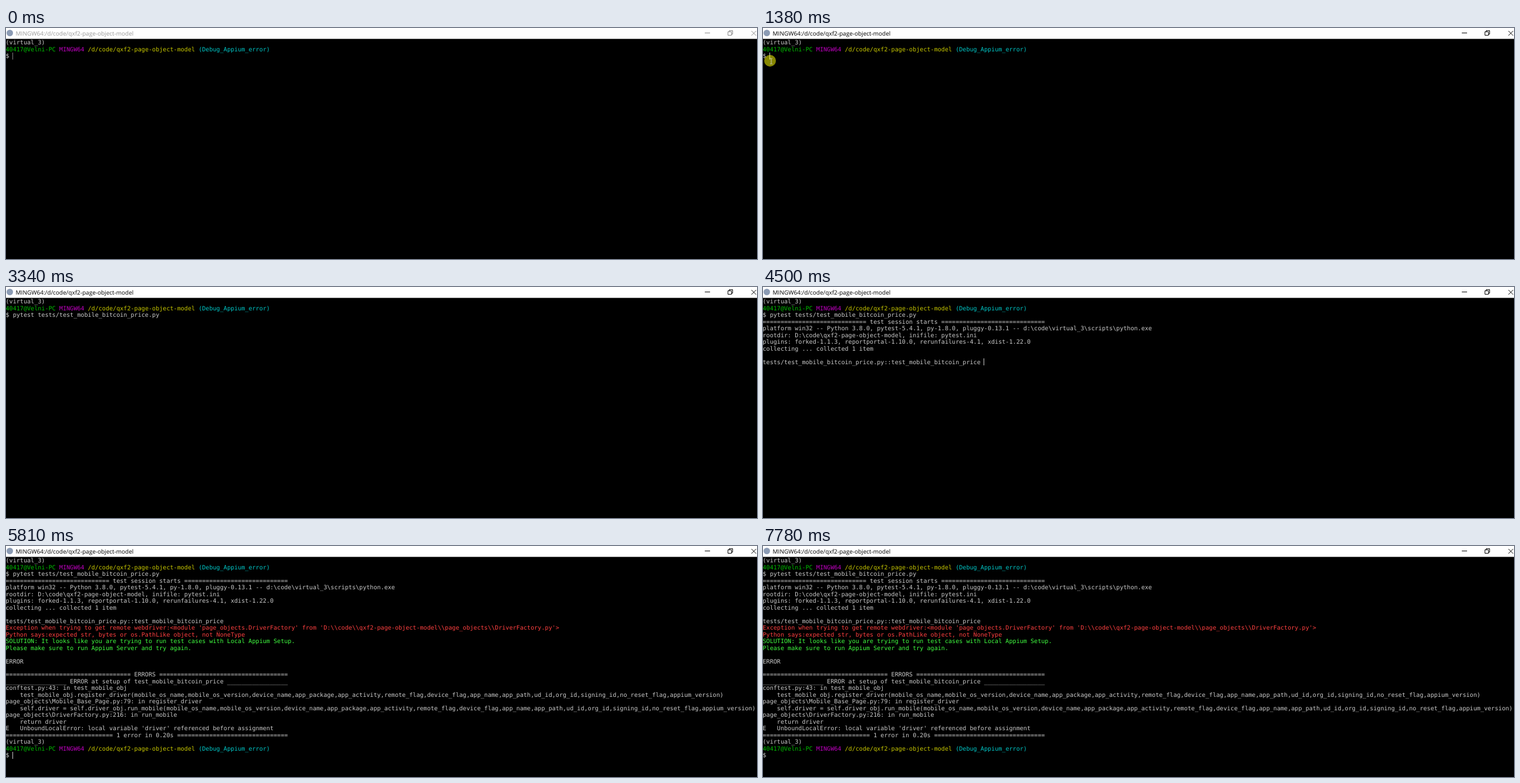
An HTML page that plays this animation: 1280 px wide and 395 px high, repeating every 8 s.

```html
<!DOCTYPE html>
<html lang="en">
<head>
<meta charset="utf-8">
<title>Terminal session</title>
<style>
  html, body { margin: 0; width: 100%; height: 100%; overflow: hidden; background: #000; }
  svg { display: block; width: 1280px; height: 395px; }
  text { white-space: pre; text-rendering: geometricPrecision; }
  #terminal text { font: 10.113px "DejaVu Sans Mono", monospace; }
  #title { font: 10px "Open Sans", "Noto Sans", sans-serif; }
</style>
</head>
<body>
<svg viewBox="0 0 1280 395">
  <rect width="1280" height="395" fill="#000"/>
  <rect width="1280" height="18.6" fill="#fff"/>
  <circle cx="6.5" cy="8.5" r="5.5" fill="#8b9bb4"/>
  <text id="title" x="16.6" y="12.7">MINGW64:/d/code/qxf2-page-object-model</text>
  <g id="buttons" fill="none" stroke-width="1">
    <path d="M1191 8.5h9"/>
    <path d="M1230.5 6.5h6v6h-6zM1232.5 6.5v-2h6v6h-2"/>
    <path d="M1270.5 5l8 8m0-8l-8 8"/>
  </g>
  <g id="terminal"></g>
  <rect id="caret" width="1" height="12"/>
  <g id="mouse">
    <circle id="halo" r="10" fill="#ff0" opacity=".53"/>
    <path d="M0 -4h1.5m1 0h1.5M2 -4v9M0 5.5h1.5m1 0h1.5" fill="none" stroke="#d0d0c0"/>
  </g>
</svg>
<script>
const LOOP = 8000;
const CELL_W = 6.088, CELL_H = 11.48, TOP = 19;
const GRAY = '#cacaca', RED = '#ff4040', LIME = '#40ff40';
const $ = id => document.getElementById(id);

const bar = (ch, left, label, right) => `${ch.repeat(left)} ${label} ${ch.repeat(right)}`;
const args = 'mobile_os_name,mobile_os_version,device_name,app_package,app_activity,' +
  'remote_flag,device_flag,app_name,app_path,ud_id,org_id,signing_id,no_reset_flag,appium_version';
const test = 'test_mobile_bitcoin_price';
const command = `pytest tests/${test}.py `;
const raw = String.raw;
const rows = [];

function addRow(time, ...parts) {
  const text = document.createElementNS('http://www.w3.org/2000/svg', 'text');
  text.setAttribute('x', -0.5);
  text.setAttribute('y', TOP + 9.3 + rows.length * CELL_H);
  for (const [content, color = GRAY] of parts) {
    const span = document.createElementNS('http://www.w3.org/2000/svg', 'tspan');
    span.setAttribute('fill', color);
    span.textContent = content;
    text.append(span);
  }
  $('terminal').append(text);
  rows.push({ time, text });
  return text;
}

function addLines(time, color, ...lines) {
  lines.forEach(line => addRow(time, [line, color]));
}

function addPrompt(time) {
  addRow(time, ['(virtual_3)']);
  addRow(time, ['40417@Velni-PC ', '#00bf00'], ['MINGW64 ', '#bf00bf'],
    ['/d/code/qxf2-page-object-model ', '#c8c800'], ['(Debug_Appium_error)', '#00c8c8']);
  return addRow(time, ['$ ']).firstChild;
}

const input = addPrompt(0);
addLines(4500, GRAY,
  bar('=', 29, 'test session starts', 29),
  raw`platform win32 -- Python 3.8.0, pytest-5.4.1, py-1.8.0, pluggy-0.13.1 -- d:\code\virtual_3\scripts\python.exe`,
  raw`rootdir: D:\code\qxf2-page-object-model, inifile: pytest.ini`,
  'plugins: forked-1.1.3, reportportal-1.10.0, rerunfailures-4.1, xdist-1.22.0',
  'collecting ... collected 1 item',
  '',
  `tests/${test}.py::${test}`);
addLines(4650, RED,
  raw`Exception when trying to get remote webdriver:<module 'page_objects.DriverFactory' from 'D:\\code\\qxf2-page-object-model\\page_objects\\DriverFactory.py'>`,
  'Python says:expected str, bytes or os.PathLike object, not NoneType');
addLines(4650, LIME,
  'SOLUTION: It looks like you are trying to run test cases with Local Appium Setup.',
  'Please make sure to run Appium Server and try again.');
addLines(4650, GRAY,
  '',
  'ERROR',
  '',
  bar('=', 35, 'ERRORS', 36),
  bar('_', 17, `ERROR at setup of ${test}`, 17),
  'conftest.py:43: in test_mobile_obj',
  `    test_mobile_obj.register_driver(${args})`,
  raw`page_objects\Mobile_Base_Page.py:79: in register_driver`,
  `    self.driver = self.driver_obj.run_mobile(${args})`,
  raw`page_objects\DriverFactory.py:216: in run_mobile`,
  '    return driver',
  "E   UnboundLocalError: local variable 'driver' referenced before assignment",
  bar('=', 30, '1 error in 0.20s', 31));
addPrompt(4820);

// Each entry holds from its time on; an entry without a value means hidden.
const at = (list, t) => list.findLast(entry => entry[0] <= t);

const typed = [[0, ''], [2630, 'clear'], [2800, command]];
const caretCells = [
  [0, 2, 2], [1930], [2490, 2, 2], [2630, 2, 7], [2800, 2, 44], [3340],
  [4500, 9, 62], [4650], [4820, 29, 2], [5350], [5810, 29, 2], [6360], [6910, 29, 2], [7460],
];

// The pointer glides in along an eased path, sampled at ten positions.
const glide = Array.from({ length: 10 }, (_, i) => {
  const rest = (1 - i / 9) ** 2;
  return [530 + i * 700 / 9, 13 + 81 * rest, 54 + 42 * rest];
});
const mousePath = [
  [0], [220, 206, 54], [300], ...glide, [1380, 12, 56], [2630],
  [7610, 58, 98], [7695, 328, 362], [7780],
];

function show(node, visible) {
  node.setAttribute('visibility', visible ? 'visible' : 'hidden');
}

function render(t) {
  const active = t >= 1380;
  $('title').setAttribute('fill', active ? '#000' : '#999');
  $('buttons').setAttribute('stroke', active ? '#000' : '#888');

  rows.forEach(row => show(row.text, t >= row.time));
  input.textContent = '$ ' + at(typed, t)[1];

  const [, row, col] = at(caretCells, t);
  show($('caret'), row !== undefined);
  if (row !== undefined) {
    $('caret').setAttribute('x', Math.floor(col * CELL_W - 0.5));
    $('caret').setAttribute('y', Math.round(TOP + row * CELL_H));
    $('caret').setAttribute('fill', active ? GRAY : '#808080');
  }

  const [, x, y] = at(mousePath, t);
  $('mouse').setAttribute('display', x === undefined ? 'none' : 'inline');
  if (x !== undefined) $('mouse').setAttribute('transform', `translate(${x} ${y})`);
  $('halo').setAttribute('display', t >= 1610 && t < 2630 ? 'none' : 'inline');
}

const start = performance.now();
function tick() {
  render((performance.now() - start) % LOOP);
  requestAnimationFrame(tick);
}
tick();
</script>
</body>
</html>
```
